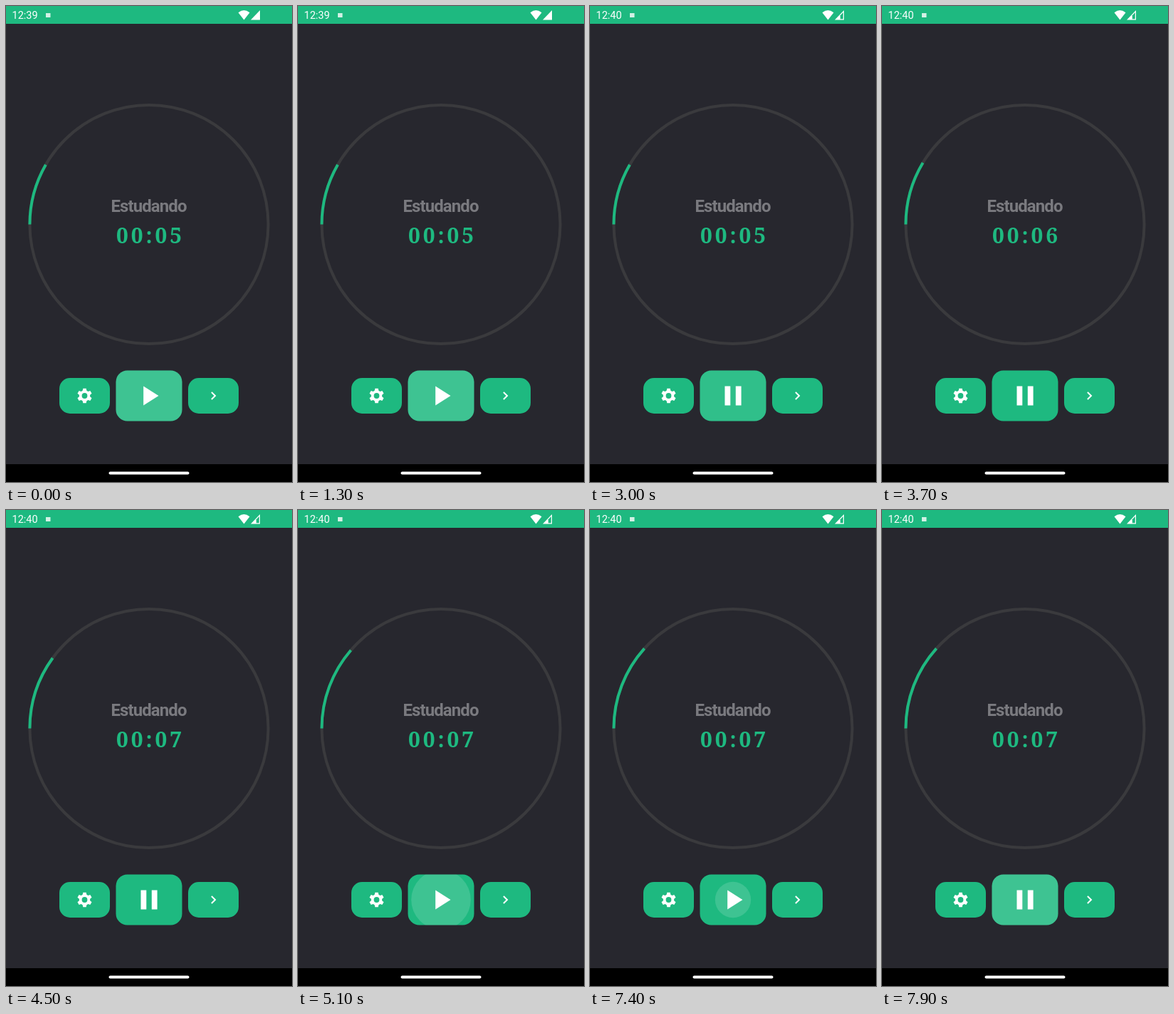
Animation of 402x668 px, one loop 8 s. Source, as an HTML page with a canvas:

```html
<!DOCTYPE html>
<html lang="pt">
<head>
<meta charset="utf-8">
<title>Study timer</title>
<style>
html, body { margin: 0; width: 100%; height: 100%; overflow: hidden; background: #27272e; }
canvas { display: block; width: 402px; height: 668px; }
</style>
</head>
<body>
<canvas id="stage"></canvas>
<script>
const W = 402, H = 668, LOOP = 8000;
const GREEN = '#1eb980', BG = '#27272e', TRACK = '#3a3a3d', LABEL = '#7a7a7f', WHITE = '#fff';
const CX = 201, CY = 306.5, R = 167.6;
const PRESSES = [2400, 5000, 7400];
const TICKS = [3400, 4400];
const TAP = 100;           // delay between a press and its effect
const GLOW = 0.14;         // ripple strength

const canvas = document.getElementById('stage');
const dpr = window.devicePixelRatio || 1;
canvas.width = W * dpr;
canvas.height = H * dpr;
const ctx = canvas.getContext('2d');
ctx.scale(dpr, dpr);

const clamp = v => Math.max(0, Math.min(1, v));
const easeInOut = p => p < 0.5 ? 2 * p * p : 1 - 2 * (1 - p) * (1 - p);
const countPast = (times, t) => times.filter(at => t >= at).length;

function rect(x, y, w, h, color) {
  ctx.fillStyle = color;
  ctx.fillRect(x, y, w, h);
}

function roundRect(x, y, w, h, r, color) {
  ctx.beginPath();
  ctx.roundRect(x, y, w, h, r);
  ctx.fillStyle = color;
  ctx.fill();
}

function poly(points, color) {
  ctx.beginPath();
  points.forEach(([x, y]) => ctx.lineTo(x, y));
  ctx.closePath();
  ctx.fillStyle = color;
  ctx.fill();
}

function arc(from, to, color) {
  ctx.beginPath();
  ctx.arc(CX, CY, R, from, to);
  ctx.strokeStyle = color;
  ctx.lineWidth = 4;
  ctx.stroke();
}

function text(str, x, y, font, color, spacing = 0, centered = false) {
  ctx.font = font;
  ctx.letterSpacing = spacing + 'px';
  ctx.fillStyle = color;
  const left = centered ? x - (ctx.measureText(str).width - spacing) / 2 : x;
  ctx.fillText(str, left, y);
}

function statusBar(t) {
  rect(0, 0, W, 25, GREEN);
  text(t < 2300 ? '12:39' : '12:40', 8.5, 18, '14.5px Roboto, sans-serif', WHITE);
  rect(56, 10, 6.5, 6, 'rgba(255,255,255,.8)');

  // wifi fan
  ctx.beginPath();
  ctx.moveTo(334.5, 19.5);
  ctx.lineTo(326.5, 9.2);
  ctx.quadraticCurveTo(334.5, 3, 342.5, 9.2);
  ctx.closePath();
  ctx.fillStyle = WHITE;
  ctx.fill();

  // signal wedge
  poly([[344, 19.5], [357, 19.5], [357, 6]], WHITE);
  if (t >= 2500) poly([[351.8, 18.2], [351.8, 13.2], [355.8, 9], [355.8, 18.2]], GREEN);
}

function dial(t) {
  const seconds = 5 + countPast(TICKS, t);
  const progress = TICKS.reduce((sum, at) => sum + easeInOut(clamp((t - at) / 1000)), 5);
  arc(0, Math.PI * 2, TRACK);
  arc(Math.PI, Math.PI + progress * Math.PI / 30, GREEN);
  text('Estudando', CX, 289, 'bold 24px Roboto, sans-serif', LABEL, -0.9, true);
  text('00:0' + seconds, CX, 332.5, 'bold 30px "Noto Serif", serif', GREEN, 4, true);
}

function gear(x, y) {
  ctx.save();
  ctx.translate(x, y);
  ctx.fillStyle = WHITE;
  ctx.beginPath();
  ctx.arc(0, 0, 7.7, 0, Math.PI * 2);
  ctx.fill();
  for (let i = 0; i < 6; i++) {
    poly([[-2.9, -6.5], [-2.2, -10.3], [2.2, -10.3], [2.9, -6.5]], WHITE);
    ctx.rotate(Math.PI / 3);
  }
  ctx.beginPath();
  ctx.arc(0, 0, 3.9, 0, Math.PI * 2);
  ctx.fillStyle = GREEN;
  ctx.fill();
  ctx.restore();
}

function chevron(x, y) {
  ctx.beginPath();
  ctx.moveTo(x - 2.6, y - 5);
  ctx.lineTo(x + 2.5, y);
  ctx.lineTo(x - 2.6, y + 5);
  ctx.strokeStyle = WHITE;
  ctx.lineWidth = 2;
  ctx.stroke();
}

function ripple(radius, alpha) {
  ctx.save();
  ctx.beginPath();
  ctx.roundRect(154.5, 511.5, 93, 71, 16);
  ctx.clip();
  ctx.beginPath();
  ctx.arc(CX, 547, radius, 0, Math.PI * 2);
  ctx.fillStyle = `rgba(255,255,255,${alpha})`;
  ctx.fill();
  ctx.restore();
}

function mainButton(t) {
  roundRect(154.5, 511.5, 93, 71, 16, GREEN);
  if (t < 2300) ripple(70, GLOW);
  for (const at of PRESSES) {
    const age = t - at;
    if (age < 0 || age > 800) continue;
    const grow = clamp((age + 60) / 300);
    ripple(15 + 50 * grow, GLOW * (1 - clamp((age - 500) / 230)));
  }
  const running = countPast(PRESSES, t - TAP) % 2 === 1;
  if (running) {
    rect(189.5, 533.5, 7.8, 27, WHITE);
    rect(204.8, 533.5, 7.8, 27, WHITE);
  } else {
    poly([[193.2, 533.5], [214.5, 547], [193.2, 560.5]], WHITE);
  }
}

function draw(t) {
  rect(0, 0, W, H, BG);
  statusBar(t);
  dial(t);
  roundRect(75, 522, 71, 50, 15, GREEN);
  roundRect(256, 522, 71, 50, 15, GREEN);
  gear(110.5, 547);
  chevron(291.5, 547);
  mainButton(t);
  rect(0, 643, W, 25, '#000');
  roundRect(144.5, 653.5, 113, 4, 2, WHITE);
}

const start = performance.now();
function frame() {
  draw((performance.now() - start) % LOOP);
  requestAnimationFrame(frame);
}
frame();
</script>
</body>
</html>
```
